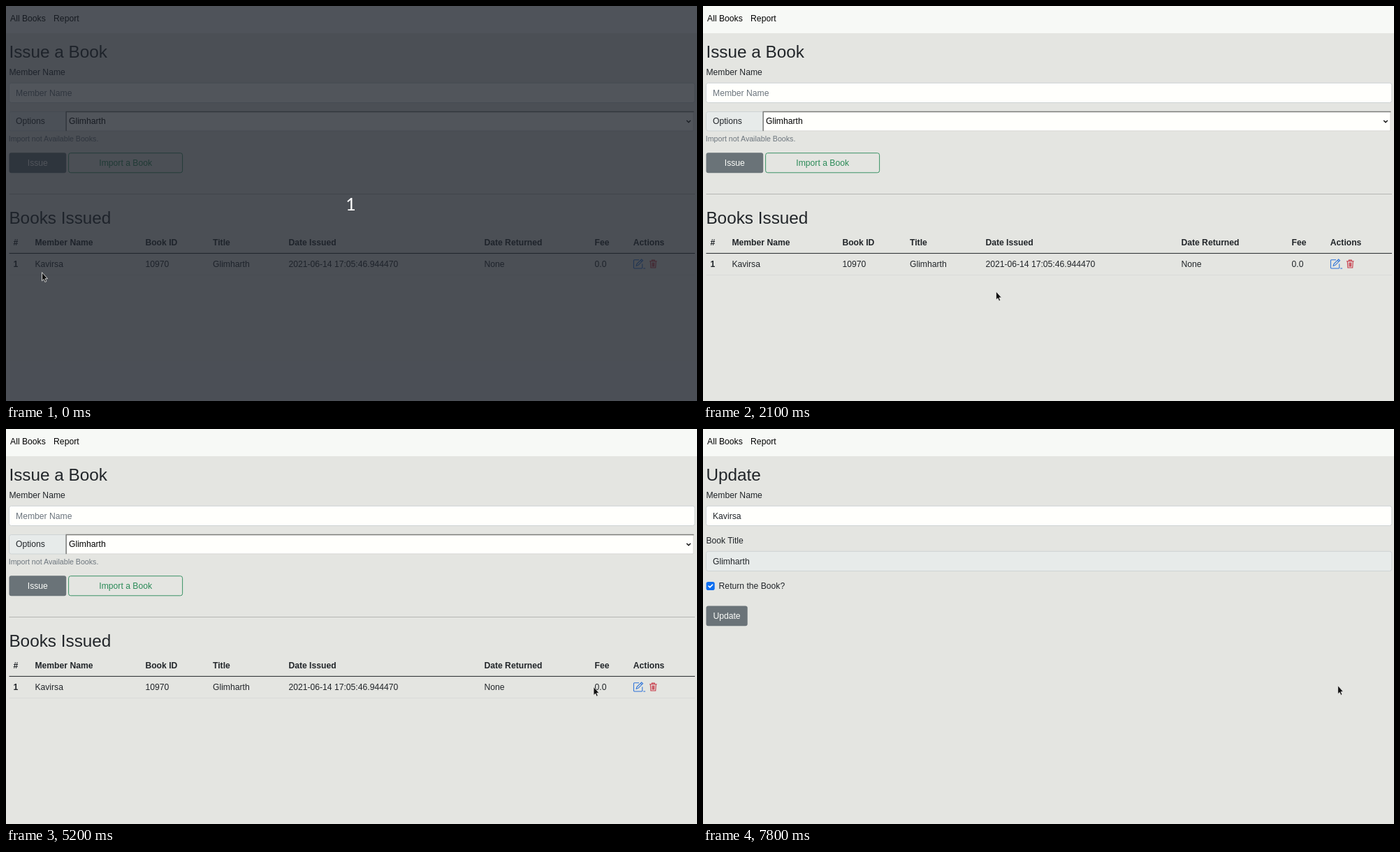
Animation, 989 px wide and 566 px high, one loop 8000 ms. Source, as an HTML page:

```html
<!DOCTYPE html>
<html lang="en">
<head>
<meta charset="utf-8">
<title>Library desk</title>
<style>
  html, body { margin: 0; width: 100%; height: 100%; overflow: hidden; background: #e4e5e1; }
  svg { display: block; }
  text { font: 12.16px "Liberation Sans", Arial, sans-serif; fill: #212529; white-space: pre; }
  .h { font-size: 24.32px; }
  .b { font-weight: bold; }
  .small { font-size: 10.64px; fill: #6c757d; }
  .muted { fill: #6c757d; }
  .light { fill: #fbfcf9; }
  .green { fill: #2a8a57; }
  .black { fill: #000; }
  .mid { text-anchor: middle; }
  .count { font: 25px Lato, sans-serif; fill: #fff; }
  .field { fill: #fffffc; stroke: #ced3d4; }
  .off { fill: #e7ebea; stroke: #ced3d4; }
  .btn { fill: #6a7378; }
  .line { fill: none; }
</style>
</head>
<body>
<svg width="989" height="566" viewBox="0 0 989 566">
  <rect width="989" height="566" fill="#e4e5e1"/>
  <rect width="989" height="39" fill="#f7f9f6"/>
  <g id="common">
    <rect x="4.5" y="110.3" width="981.3" height="28.2" rx="3" class="field"/>
  </g>

  <g id="list">
    <path d="M85.5 151.5H7.5a3 3 0 0 0-3 3v21.5a3 3 0 0 0 3 3H85.5z" class="off"/>
    <rect x="86" y="151" width="898.5" height="28.4" fill="#fffffc"/>
    <path d="M86.5 179H984V151.5" class="line" stroke="#cfcfcc"/>
    <path d="M86.2 179.3V151.5H984.5" class="line" stroke="#7b7c79" stroke-width="1.4"/>
    <path d="M974.2 163.9l2.8 2.9 2.8-2.9" class="line" stroke="#111" stroke-width="1.4"/>
    <rect x="4.5" y="210.3" width="81.7" height="28.9" rx="3" class="btn"/>
    <rect x="89.6" y="210.7" width="163" height="28.1" rx="3" class="line" stroke="#3a9265"/>
    <path d="M4.5 269.5H986" stroke="#b5b6b3"/>
    <path d="M4.5 354.4H986" stroke="#212529"/>
    <path d="M4.5 385.5H986" stroke="#d9dbd9"/>
    <g id="pencil" class="line" transform="translate(897 362.3) scale(.95)" stroke="#2a71d8" stroke-width="1.1">
      <path d="M9.5 1.5h-7a1 1 0 0 0-1 1v11a1 1 0 0 0 1 1h11a1 1 0 0 0 1-1v-6"/>
      <path d="M5.4 10.6l.9-3 7-7 2 2-7 7zM11.6 2.2l2 2M16 14.4h3"/>
    </g>
    <g class="line" stroke="#c73a48" stroke-width="1.1">
      <path d="M921 365.7h10.6M924.4 365.5v-1.4h3.8v1.4"/>
      <path d="M922.3 366l.6 9h6.8l.6-9M924.8 367.6l.2 5.8M926.3 367.6v5.8M927.8 367.6l-.2 5.8"/>
    </g>
  </g>

  <g id="edit">
    <rect x="4.5" y="175.3" width="981.3" height="28.2" rx="3" class="off"/>
    <rect x="4.6" y="218.9" width="12.1" height="12.1" rx="2.8" fill="#0d6ef0"/>
    <path d="M8 225l1.9 1.9 3.7-3.8" class="line" stroke="#fff" stroke-width="1.6" stroke-linecap="round" stroke-linejoin="round"/>
    <rect x="4.5" y="253.4" width="59.2" height="28.9" rx="3" class="btn"/>
  </g>

  <g id="shade">
    <rect width="989" height="566" fill="#1d222c" fill-opacity=".77"/>
    <text class="count mid" x="493.5" y="292.5">1</text>
  </g>

  <g id="cursor">
    <path id="arrow" d="M.3.4V12.6L2.9 10.2 4.6 14.2 6.6 13.3 4.9 9.4H8.3z" fill="#111"
      stroke="#f2f2ef" stroke-width=".8" stroke-linejoin="round"/>
    <path id="hand" d="M.2 7.6V.4A1.2 1.2 0 0 1 2.6.4V4.6L6.9 5.3Q8.3 5.7 8.2 7L7.5 11V13H1.2V11.4L-3.3 7.4Q-3.6 6-2 6.1z"
      fill="#fff" stroke="#111" stroke-linejoin="round"/>
  </g>
</svg>
<script>
const $ = id => document.getElementById(id);
const LOOP = 8000, STEP = 100, GLIDE = 400, ROW = 369;
const member = "Kavirsa", book = "Glimharth";

// Text whose capitals are centred on the height y
function label(parent, x, y, str, cls = "") {
  const el = document.createElementNS("http://www.w3.org/2000/svg", "text");
  const attrs = { x, y, dy: ".345em", class: cls };
  for (const key in attrs) el.setAttribute(key, attrs[key]);
  el.textContent = str;
  $(parent).append(el);
}

label("common", 6.1, 17.7, "All Books", "black");
label("common", 68.1, 17.7, "Report", "black");
label("common", 4.4, 95, "Member Name");

label("list", 4.4, 65.2, "Issue a Book", "h");
label("list", 14, 124.6, "Member Name", "muted");
label("list", 14, 165.3, "Options");
label("list", 90, 165.3, book, "black");
label("list", 3.8, 190.6, "Import not Available Books.", "small");
label("list", 45.3, 225, "Issue", "light mid");
label("list", 171.2, 225, "Import a Book", "green mid");
label("list", 4.4, 303.6, "Books Issued", "h");

const columns = [
  [10.6, "#", "1"], [41.4, "Member Name", member], [199.4, "Book ID", "10970"],
  [296, "Title", book], [404.4, "Date Issued", "2021-06-14 17:05:46.944470"],
  [684.4, "Date Returned", "None"], [842.5, "Fee", "0.0"], [897.8, "Actions", ""]
];
columns.forEach(([x, head, cell], i) => {
  label("list", x, 338.6, head, "b");
  label("list", x, 369.6, cell, i ? "" : "b");
});

label("edit", 4.4, 65.2, "Update", "h");
label("edit", 14, 124.6, member);
label("edit", 4.4, 160, "Book Title");
label("edit", 14, 189.5, book);
label("edit", 22.6, 225, "Return the Book?");
label("edit", 34, 268, "Update", "light mid");

// Places the pointer reaches: time, x, y
const stops = [
  [0, 51.2, 381.3], [800, 53, 376], [1400, 68, 382], [1800, 417, 436],
  [2100, 419.1, 408.5], [2300, 404], [2700, 507], [3200, 611], [4000, 743],
  [4200, 680.5, 371.5], [4600, 723], [4900, 876], [5100, 836], [5500, 866],
  [5900, 914], [6100, 908.3, 367.2]
];

// Rest at each stop, then glide to the next one just before its time
function pointerAt(t) {
  const next = stops.findIndex(stop => stop[0] > t);
  if (next < 0) return stops.at(-1).slice(1);
  const [t0, x0, y0 = ROW] = stops[next - 1];
  const [t1, x1, y1 = ROW] = stops[next];
  const p = Math.max(0, 1 - (t1 - t) / Math.min(GLIDE, t1 - t0));
  const ease = p * p * (3 - 2 * p);
  return [x0 + (x1 - x0) * ease, y0 + (y1 - y0) * ease];
}

const show = (id, on) => $(id).setAttribute("visibility", on ? "visible" : "hidden");

function draw(time) {
  const t = Math.floor(time % LOOP / STEP) * STEP;
  const [x, y] = pointerAt(t);
  const editing = t >= 7800;
  const hover = x > 897;
  const hand = hover && t < 7700;
  show("list", !editing);
  show("edit", editing);
  show("shade", t < 100);
  show("arrow", !hand);
  show("hand", hand);
  $("pencil").setAttribute("stroke", hover ? "#215bb0" : "#2a71d8");
  $("cursor").setAttribute("transform", `translate(${x} ${y})`);
}

const start = performance.now();
function tick() {
  draw(performance.now() - start);
  requestAnimationFrame(tick);
}
tick();
</script>
</body>
</html>
```
